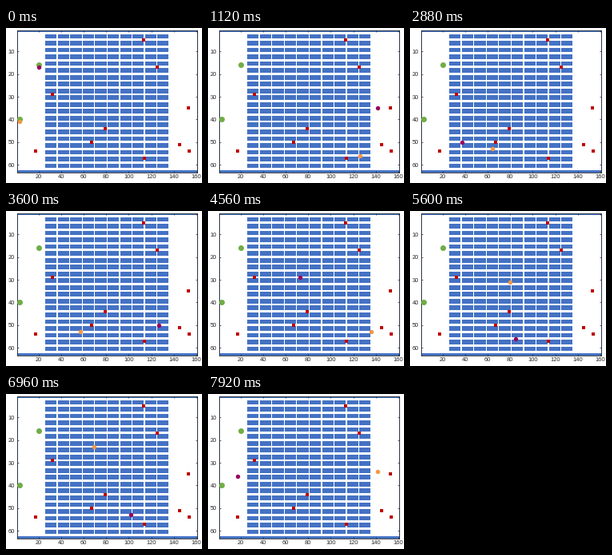
Write a matplotlib script that moves like this. It is 245x194 px and loops after 8 s.

```python
import numpy as np
import matplotlib.pyplot as plt
from matplotlib.animation import FuncAnimation
from matplotlib.colors import to_rgb

W, H, DPI = 245, 194, 100
FRAMES, INTERVAL, STRIDE = 100, 80, 10
COLS, ROWS = 160, 63
PX = 72 / DPI  # one pixel in points

BLUE, GREEN, RED = "#4472c4", "#70ad47", "#c00000"
PURPLE, ORANGE, INK = "#99005c", "#f79646", "#262626"

STATIONS = [(20, 16), (3, 40)]
TASKS = [(113, 5), (125, 17), (32, 29), (153, 35), (79, 44),
         (67, 50), (145, 51), (17, 54), (154, 54), (114, 57)]

# Routes as (step, column, row); robots cover one cell per step.
PURPLE_ROUTE = [
    (0, 20, 16), (19, 20, 35), (152, 153, 35), (173, 153, 56), (174, 153, 56),
    (258, 69, 56), (285, 69, 29), (322, 32, 29), (335, 32, 29), (339, 36, 29),
    (360, 36, 50), (469, 145, 50), (470, 145, 51), (477, 145, 51),
    (499, 145, 29), (612, 32, 29), (615, 32, 29), (619, 36, 29), (625, 36, 29),
    (652, 36, 56), (730, 114, 56), (731, 114, 57), (732, 114, 56),
    (763, 145, 56), (784, 145, 35), (792, 153, 35), (821, 124, 35),
    (842, 124, 56), (864, 102, 56), (867, 102, 53), (871, 102, 53),
    (904, 69, 53), (907, 69, 50), (909, 67, 50), (927, 67, 50),
    (977, 17, 50), (991, 17, 36)]
ORANGE_ROUTE = [
    (0, 3, 40), (16, 3, 56), (127, 114, 56), (128, 114, 57), (129, 114, 56),
    (160, 145, 56), (165, 145, 51), (186, 145, 51), (207, 124, 51),
    (253, 124, 5), (297, 80, 5), (345, 80, 53), (408, 17, 53), (409, 17, 54),
    (410, 17, 54), (411, 17, 53), (548, 154, 53), (549, 154, 54),
    (552, 154, 54), (553, 154, 53), (583, 124, 53), (631, 124, 5),
    (675, 80, 5), (701, 80, 31), (703, 80, 29), (750, 33, 29), (752, 32, 29),
    (756, 36, 29), (774, 36, 47), (792, 18, 47), (816, 18, 23), (867, 69, 23),
    (871, 69, 23), (915, 113, 23), (933, 113, 5), (944, 124, 5),
    (956, 124, 17), (974, 142, 17), (991, 142, 34)]


def warehouse():
    """Walls around the floor, 10 x 20 shelves of 10 by 2 cells."""
    x, y = np.meshgrid(np.arange(1, COLS + 1), np.arange(1, ROWS + 1))
    wall = (x == 1) | (x == COLS) | (y == 1) | (y == ROWS)
    block = (x >= 26) & (x <= 135) & (y >= 3) & (y <= 61)
    shelf = block & ((x - 26) % 11 < 10) & (y % 3 != 2)
    floor = np.ones((ROWS, COLS, 3))
    floor[wall | shelf] = to_rgb(BLUE)
    return floor


def position(route, step):
    t, x, y = np.array(route).T
    return np.interp(step, t, x), np.interp(step, t, y)


def dots(points, marker, size, color, z):
    x, y = zip(*points)
    return ax.plot(x, y, marker, ms=size * PX, color=color, mew=0, zorder=z)[0]


plt.rcParams["font.family"] = "Liberation Sans"
fig = plt.figure(figsize=(W / DPI, H / DPI), dpi=DPI, facecolor="white")
left, top, width, height = 13.5, 2.5, 225, 178.5
ax = fig.add_axes([left / W, 1 - (top + height) / H, width / W, height / H])
ax.imshow(warehouse(), extent=(0.5, COLS + 0.5, ROWS + 0.5, 0.5),
          aspect="auto", interpolation="nearest")
ax.set_xticks(range(20, 161, 20))
ax.set_yticks(range(10, 61, 10))
ax.tick_params(direction="in", top=True, right=True, length=2 * PX,
               width=0.7 * PX, pad=2.5 * PX, labelsize=7.5 * PX,
               color=INK, labelcolor=INK)
for spine in ax.spines.values():
    spine.set(linewidth=0.8 * PX, color=INK)

dots(STATIONS, "o", 7, GREEN, 3)
dots(TASKS, "s", 4.4, RED, 4)
routes = PURPLE_ROUTE, ORANGE_ROUTE
robots = [dots([position(route, 0)], "o", 5.4, color, 5)
          for route, color in zip(routes, (PURPLE, ORANGE))]
ax.set_xlim(0.5, COLS + 0.5)
ax.set_ylim(ROWS + 0.5, 0.5)


def update(frame):
    step = 1 + STRIDE * frame
    for robot, route in zip(robots, routes):
        x, y = position(route, step)
        robot.set_data([x], [y])
    return robots


anim = FuncAnimation(fig, update, frames=FRAMES, interval=INTERVAL,
                     init_func=lambda: update(0), repeat=True, repeat_delay=0)
plt.show()
```
